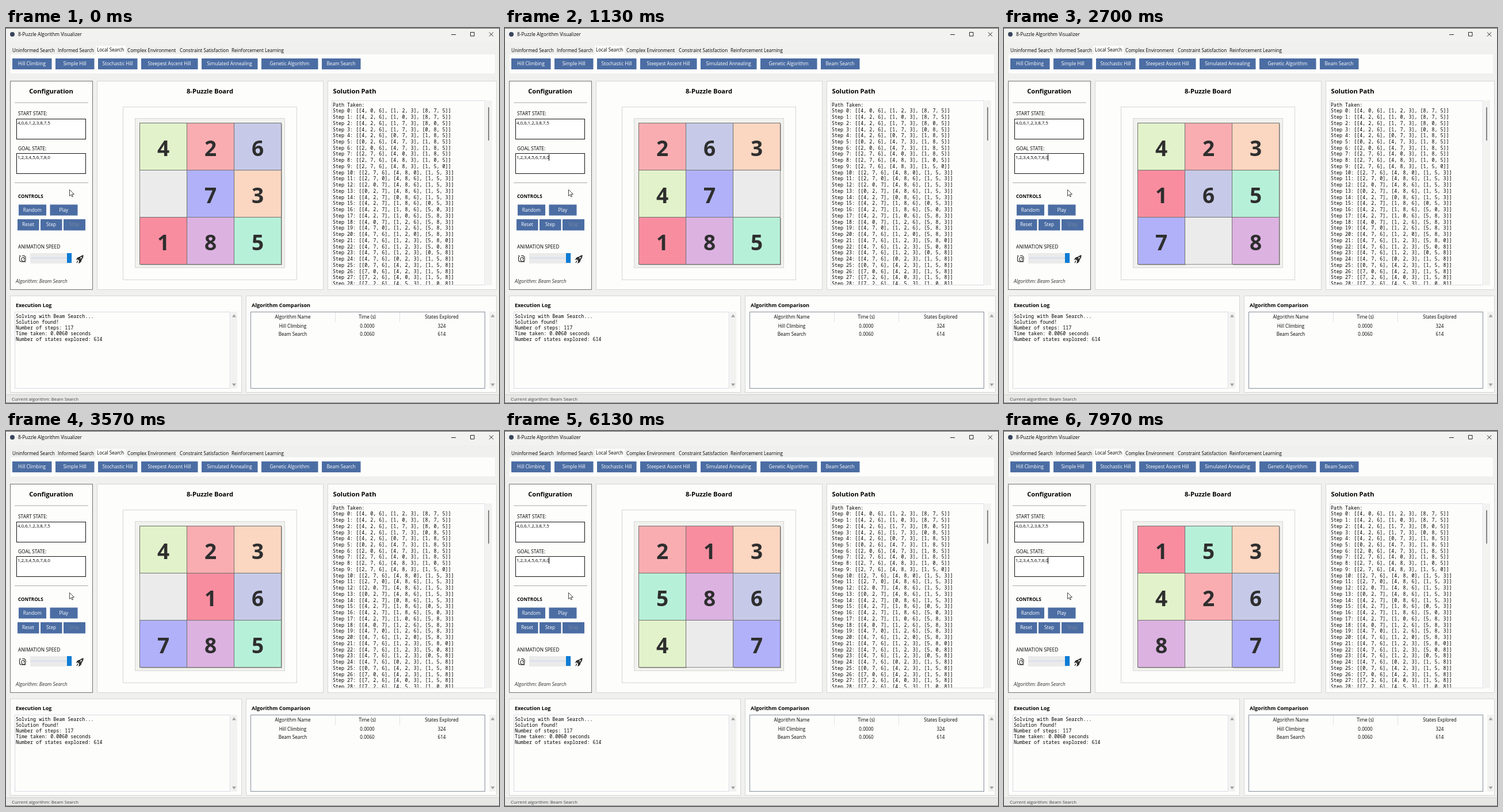
An HTML page that plays this animation: 857 by 653 pixels, repeating every 8 s.

```html
<!DOCTYPE html>
<html lang="en">
<head>
<meta charset="utf-8">
<title>8-Puzzle</title>
<style>
  html, body { margin: 0; width: 100%; height: 100%; overflow: hidden; background: #f0f0f0; }
  svg { display: block; width: 857px; height: 653px; }
  text { font-family: "Open Sans", "Noto Sans", sans-serif; fill: #000; }
  .mono { font-family: "Noto Sans Mono", "DejaVu Sans Mono", monospace; font-weight: 500; }
</style>
</head>
<body>
<svg id="stage" viewBox="0 0 857 653"></svg>
<script>
const LOOP = 8000, CELL = 82, BOARD_X = 232, BOARD_Y = 165;
const BLUE = "#4b6da3", PALE = "#d6d6d4", PAPER = "#fdfdfc";
const TILE_COLORS = ["#ebebeb", "#f98da0", "#f9adb1", "#fbd6c0", "#e2f2ca",
                     "#b7f0d8", "#c6cae8", "#b1b1fa", "#dcb2e1"];

// Directions in which the blank travels
const OFFSETS = { U: -3, D: 3, L: -1, R: 1 };
function slide(board, move) {
  const next = [...board], blank = board.indexOf(0), other = blank + OFFSETS[move];
  [next[blank], next[other]] = [next[other], 0];
  return next;
}
function walk(start, moves) {
  const boards = [start];
  for (const move of moves) boards.push(slide(boards.at(-1), move));
  return boards;
}

const solution = walk([4, 0, 6, 1, 2, 3, 8, 7, 5], "DDLUURDDRUULLDDRUURDDLLUURDD");
const played = walk(solution[4], "URRDDLUULDDRRULLURDDRULDLURRDLUULDRULDDR");

// Bursts of moves: [first time, count, interval]
const moveTimes = [[395, 14, 205], [3330, 5, 160], [4370, 5, 160], [5370, 6, 150], [6370, 10, 175]]
  .flatMap(([start, count, gap]) => Array.from({ length: count }, (_, i) => start + i * gap));
const caretOff = [-150, 780, 1720, 2710, 3560, 4460, 5370, 6370, 7270];

// Markup helpers; boxes are given by their edges, text by its vertical centre
const rect = (x1, y1, x2, y2, fill, stroke = "none") => {
  const inset = stroke === "none" ? 0 : .5;
  return `<rect x="${x1 + inset}" y="${y1 + inset}" width="${x2 - x1 - 2 * inset}"
    height="${y2 - y1 - 2 * inset}" fill="${fill}" stroke="${stroke}"/>`;
};
const path = (d, stroke, fill = "none", width = 1) =>
  `<path d="${d}" stroke="${stroke}" fill="${fill}" stroke-width="${width}"/>`;
const text = (x, y, label, size = 8.15, attrs = "") =>
  `<text x="${x}" y="${y + size * .36}" font-size="${size}" ${attrs}>${label}</text>`;
const centred = (x, y, label, size, attrs = "") =>
  text(x, y, label, size, `text-anchor="middle" ${attrs}`);
const mono = (x, y, label) => text(x, y, label, 8.37, 'class="mono"');
const bold = 'font-weight="700"';
const button = (x1, y1, x2, y2, label, color = "#fff") =>
  rect(x1, y1, x2 + .5, y2 + .5, BLUE) +
  centred((x1 + x2) / 2, (y1 + y2) / 2, label, 8.2, `style="fill:${color}"`);
const arrows = x => path(`M${x - 3.5} 503.5l3.5-5 3.5 5z M${x - 3.5} 619l3.5 5 3.5-5z`, "none", "#a2a2a2");

function titleBar() {
  return rect(0, 0, 857, 24, "#f2f3f1") + rect(0, 0, 857, 1, "#606060") +
    '<circle cx="11" cy="11" r="4" fill="#38465c"/>' +
    text(21, 11.5, "8-Puzzle Algorithm Visualizer", 8.28) +
    path("M774 11.5h8 M807.5 7.5h6.5v6.5h-6.5z M840 7.5l7 7 M847 7.5l-7 7", "#222");
}

function toolbar() {
  const tabs = [[11, "Uninformed Search"], [90, "Informed Search"], [158, "Local Search"],
    [211, "Complex Environment"], [302, "Constraint Satisfaction"], [392, "Reinforcement Learning"]];
  const tools = [[11, 79, "Hill Climbing"], [86, 153, "Simple Hill"], [160, 228, "Stochastic Hill"],
    [235, 333, "Steepest Ascent Hill"], [340, 437, "Simulated Annealing"],
    [444, 542, "Genetic Algorithm"], [549, 616, "Beam Search"]];
  return rect(8, 46, 850, 79, PAPER) + rect(156, 31, 208, 47, PAPER) +
    tabs.map(([x, label]) => text(x, label === "Local Search" ? 38 : 39.5, label)).join("") +
    tools.map(([x1, x2, label]) => button(x1, 53, x2, 71.5, label)).join("");
}

function configPanel() {
  const snail = path("M23.500 398v6q0 3 4 3h7 M25.500 398l-2-2 M28 396.500h3q4 1 3 6 0 4-4 4-4-1-3-5 1-3 4-2 2 2 0 4", "#222", "none", 1.1);
  const rocket = path("M126 403q2-5 8-7 0 6-6 9z M126 402l-3 1 2-3 3-1 M128 405l-1 4 3-2 1-4 M125 405l-2 4", "#111", "#555", 1.1) +
    '<circle cx="130.5" cy="400" r="1.200" fill="#fff"/>';
  return rect(7, 92, 151, 456, PAPER, "#747474") +
    centred(78.5, 110, "Configuration", 11.15, bold) +
    path("M15 130h128 M15 269.5h128", "#a9a9a9") +
    text(21, 149, "START STATE:", 8.4) + rect(18, 158, 139, 194, "#fff", "#111") +
    text(20, 165, "4,0,6,1,2,3,8,7,5", 8) +
    text(21, 209.5, "GOAL STATE:", 8.4) + rect(18, 218, 139, 254, "#fff", "#111") +
    text(20, 225, "1,2,3,4,5,6,7,8,0", 8) +
    '<rect id="caret" x="76" y="220" width="1" height="11" fill="#000"/>' +
    text(21, 293, "CONTROLS", 8.15, bold) +
    button(22, 307.5, 69.5, 326, "Random") + button(76.5, 307.5, 124, 326, "Play") +
    button(20, 333, 57, 352, "Reset") + button(60, 333, 97, 352, "Step") +
    button(100, 333, 137.5, 352, "Stop", "#7c88a0") +
    text(21, 381, "ANIMATION SPEED", 8.4) +
    rect(42, 392, 115, 410, "#ebebeb") + rect(43, 399, 106, 402, "#dde1ea") +
    rect(106, 392, 114, 409, "#0b7cd5") + snail + rocket +
    text(17, 440.5, "Algorithm: Beam Search", 8.5, 'font-style="italic" style="fill:#333"');
}

function boardPanel() {
  const shadows = TILE_COLORS.map((color, value) => `<g id="shadow${value}">` +
    (value ? rect(2, 2, CELL + 2, CELL + 2, "#b4b4b0") : "") + "</g>").join("");
  const faces = TILE_COLORS.map((color, value) => `<g id="face${value}">` +
    rect(0, 0, CELL + 1, CELL + 1, color, value ? "#71716f" : "#8c8c8a") +
    (value ? centred(CELL / 2 + .5, 44.5, value, 37, `${bold} style="fill:#2e2e2e"`) : "") + "</g>").join("");
  return rect(158, 92, 552, 456, PAPER, PALE) +
    centred(354.5, 110, "8-Puzzle Board", 11.15, bold) +
    rect(203, 137, 506, 439, PAPER, PALE) + rect(224, 157, 485, 418, "#f1f1ee", PALE) + shadows + faces;
}

function solutionPanel() {
  const rows = board => [0, 3, 6].map(i => `[${board.slice(i, i + 3).join(", ")}]`).join(", ");
  return rect(559, 92, 853, 456, PAPER, PALE) +
    text(568.5, 110, "Solution Path", 11.15, bold) +
    rect(566, 126, 833, 448, PAPER, "#dcdce4") + rect(834, 126, 845, 448, "#f2f2f1") +
    rect(838, 138, 840, 196, "#858585") +
    '<clipPath id="listing"><path d="M567 127h265v320h-265z"/></clipPath><g clip-path="url(#listing)">' +
    mono(568, 133.5, "Path Taken:") +
    solution.map((board, i) => mono(568, 144.3 + i * 10.74, `Step ${i}: [${rows(board)}]`)).join("") + "</g>";
}

function lowerPanels() {
  const log = ["Solving with Beam Search...", "Solution found!", "Number of steps: 117",
    "Time taken: 0.0060 seconds", "Number of states explored: 614"];
  const table = [[503.5, "Algorithm Name", "Time (s)", "States Explored"],
    [519.5, "Hill Climbing", "0.0000", "324"], [533.5, "Beam Search", "0.0060", "614"]];
  return rect(7, 466, 410, 635, PAPER, PALE) + rect(417, 466, 853, 635, PAPER, PALE) +
    text(17, 483, "Execution Log", 9.05, bold) + text(427, 483, "Algorithm Comparison", 9.05, bold) +
    rect(15, 494, 390, 628, PAPER, "#d9d9e2") + rect(391, 494, 402, 628, "#f2f2f1") + arrows(396.5) +
    log.map((line, i) => mono(17, 501.5 + i * 10, line)).join("") +
    rect(425, 494, 833, 628, PAPER, "#87909a") + rect(840, 494, 851, 628, "#f2f2f1") + arrows(846) +
    path("M572.5 495v17 M684.5 495v17", "#e2e2e2") +
    table.map(([y, ...cells]) =>
      cells.map((cell, i) => centred([498.5, 628, 757.5][i], y, cell, 8.1)).join("")).join("") +
    rect(0, 638, 857, 653, "#e7e7e6") + rect(0, 638, 857, 639, "#d3d3d2") +
    rect(0, 652, 857, 653, "#8a8a8a") +
    text(10, 646.5, "Current algorithm: Beam Search", 7.75, 'style="fill:#444"');
}

const pointer = path("M110.5 281.5v11l2.6-2.4 1.8 3.9 1.7-.8-1.8-3.7h3.7z", "#333", "#fff", .9);

document.getElementById("stage").innerHTML = rect(0, 0, 857, 653, "#f0f0ef") + titleBar() + toolbar() +
  configPanel() + boardPanel() + solutionPanel() + lowerPanels() + pointer;

const caret = document.getElementById("caret");
function place(id, index) {
  const x = BOARD_X + index % 3 * CELL, y = BOARD_Y + Math.floor(index / 3) * CELL;
  document.getElementById(id).setAttribute("transform", `translate(${x} ${y})`);
}

let shown = -1;
function render(now) {
  const t = now % LOOP;
  const step = moveTimes.filter(time => time <= t).length;
  if (step !== shown) {
    played[step].forEach((value, i) => { place("shadow" + value, i); place("face" + value, i); });
    shown = step;
  }
  const hidden = caretOff.some(start => t >= start && t < start + 300);
  caret.setAttribute("visibility", hidden ? "hidden" : "visible");
}

const began = performance.now();
function tick() {
  render(performance.now() - began);
  requestAnimationFrame(tick);
}
tick();
</script>
</body>
</html>
```
